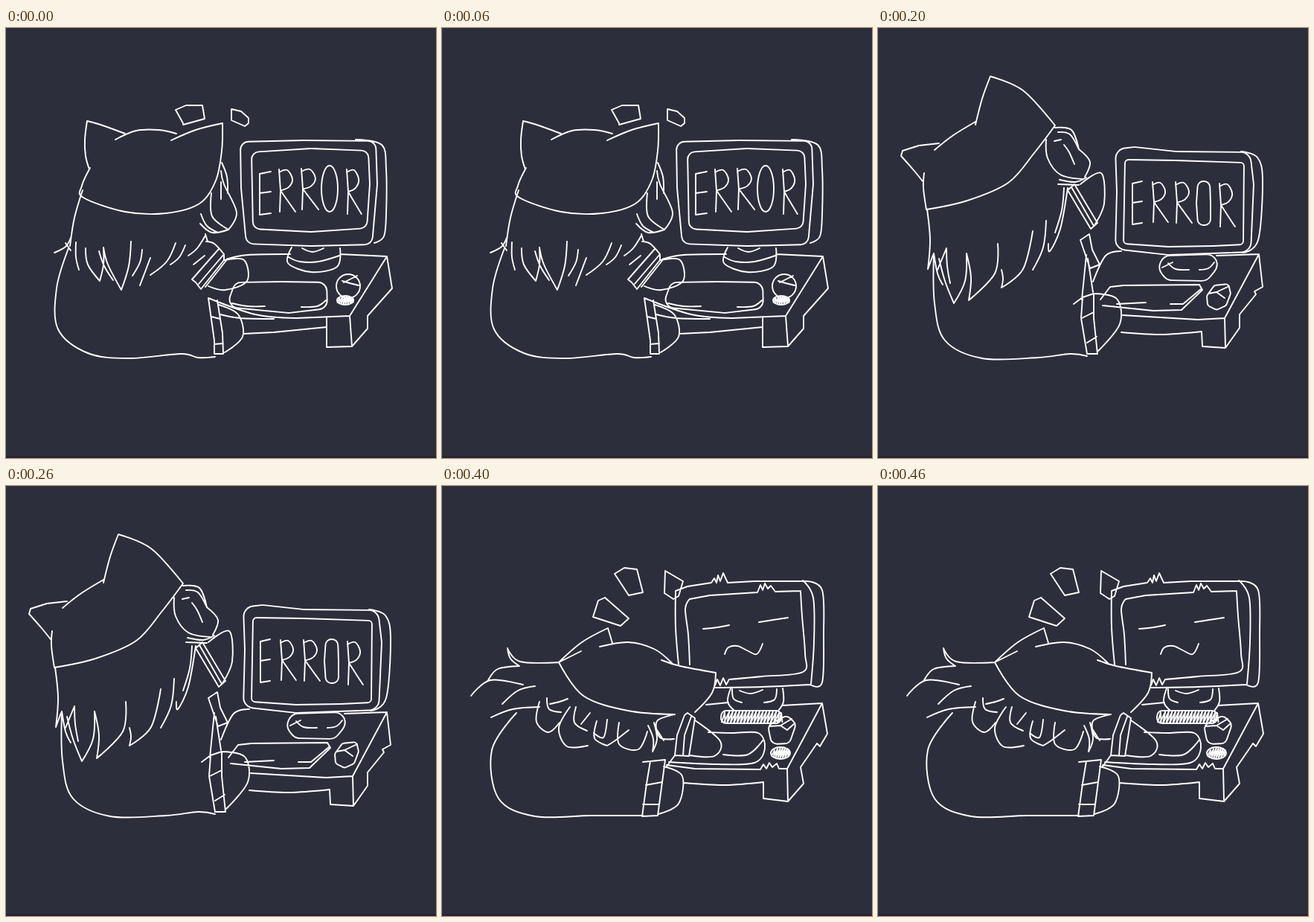
An HTML page with a canvas that plays this animation: 578 px wide and 578 px high, repeating every 0.5 s.

```html
<!DOCTYPE html>
<html lang="en">
<head>
<meta charset="utf-8">
<title>Computer error</title>
<style>
  html, body { margin: 0; width: 100%; height: 100%; overflow: hidden; background: #2d2e3b; }
  canvas { display: block; width: 100%; height: 100%; }
</style>
</head>
<body>
<canvas id="stage" width="578" height="578"></canvas>
<script>
const ctx = document.getElementById('stage').getContext('2d');

// Straight segments through the points.
function line(x, y, ...rest) {
  ctx.moveTo(x, y);
  for (let i = 0; i < rest.length; i += 2) ctx.lineTo(rest[i], rest[i + 1]);
}

// Smooth stroke through the points.
function curve(...p) {
  const slope = i => i < 2 || i > p.length - 3 ? [0, 0]
    : [(p[i + 2] - p[i - 2]) / 6, (p[i + 3] - p[i - 1]) / 6];
  ctx.moveTo(p[0], p[1]);
  for (let i = 2; i < p.length; i += 2) {
    const [ax, ay] = slope(i - 2), [bx, by] = slope(i);
    ctx.bezierCurveTo(p[i - 2] + ax, p[i - 1] + ay, p[i] - bx, p[i + 1] - by, p[i], p[i + 1]);
  }
}

// Closed polygon with rounded corners.
function rounded(r, ...p) {
  const n = p.length;
  ctx.moveTo((p[0] + p[n - 2]) / 2, (p[1] + p[n - 1]) / 2);
  for (let i = 0; i < n; i += 2) ctx.arcTo(p[i], p[i + 1], p[(i + 2) % n], p[(i + 3) % n], r);
  ctx.closePath();
}

function oval(x, y, rx, ry) {
  ctx.moveTo(x + rx, y);
  ctx.ellipse(x, y, rx, ry, 0, 0, 7);
}

// Slanted scribble inside an oval; a higher power squares its ends.
function hatch(x, y, rx, ry, gap, power) {
  for (let u = 2 - rx; u < rx - 1; u += gap) {
    const h = ry * (1 - Math.abs(u / rx) ** power) ** (1 / power);
    const lean = Math.min(h / 2, rx - Math.abs(u));
    line(x + u - lean, y + h, x + u + lean, y - h, x + u + gap - lean, y + h);
  }
}

function letterE(x, y, w, h) {
  line(x + w, y, x, y + 3, x, y + h, x + w, y + h - 2);
  line(x, y + h / 2, x + w, y + h / 2 - 2);
}

function letterR(x, y, w, h) {
  line(x, y, x + 2, y + h / 2, x + 1, y + h);
  curve(x, y + 4, x + w * .55, y + 1, x + w * .9, y + h * .23, x + w * .65, y + h * .42, x + 2, y + h / 2);
  curve(x + 2, y + h / 2, x + w * .6, y + h * .75, x + w * 1.1, y + h);
}

function typing() {
  curve(112, 190, 107, 172, 106, 150, 109, 125);
  curve(109, 125, 130, 131, 160, 142);
  curve(147, 150, 175, 138, 205, 137, 229, 142);
  curve(222, 151, 255, 137, 291, 128);
  curve(291, 128, 290, 165, 282, 205, 260, 236, 215, 249, 160, 247, 104, 228, 102, 212, 113, 188);
  line(238, 128, 228, 110, 242, 104, 264, 104, 267, 122, 238, 130);
  line(303, 109, 316, 112, 326, 121, 326, 128, 321, 132, 303, 124, 303, 109);

  curve(103, 218, 92, 255, 86, 293);
  curve(65, 302, 80, 294, 87, 282);
  line(80, 289, 87, 299);
  curve(94, 288, 94, 308, 98, 325);
  curve(107, 296, 110, 318, 126, 340);
  curve(126, 340, 131, 318, 131, 295);
  curve(125, 300, 132, 320, 144, 339);
  curve(131, 295, 137, 318, 155, 352);
  curve(155, 352, 165, 320, 168, 287);
  curve(170, 333, 180, 315, 183, 298);
  curve(180, 346, 188, 325, 194, 309);
  curve(194, 332, 216, 314, 228, 289);
  curve(221, 318, 233, 308, 241, 292);
  curve(245, 306, 257, 296, 268, 279);

  curve(290, 181, 297, 200, 298, 222);
  curve(289, 192, 293, 210, 310, 248, 299, 271);
  curve(276, 222, 277, 253, 299, 271);
  line(289, 207, 289, 230);
  curve(261, 263, 277, 275, 299, 271);
  curve(262, 250, 270, 266, 285, 275);
  line(268, 277, 271, 287);

  curve(84, 296, 68, 350, 70, 405, 110, 437, 165, 444, 235, 438, 258, 443, 281, 442);
  curve(269, 287, 280, 290, 293, 304);
  line(286, 297, 250, 338, 255, 342, 262, 351, 293, 312, 293, 304, 259, 344);
  line(267, 306, 252, 318);
  line(298, 310, 268, 348);
  curve(294, 312, 320, 312, 324, 340, 295, 352, 272, 347);
  line(272, 363, 280, 420, 280, 438, 292, 438, 291, 410, 284, 366);
  line(276, 388, 288, 391);
  line(280, 425, 292, 424);
  curve(286, 372, 312, 385, 318, 415, 294, 436);

  curve(296, 311, 325, 305, 382, 304);
  line(449, 304, 512, 307, 462, 387, 390, 390);
  curve(390, 390, 335, 385, 272, 363);
  curve(288, 385, 315, 390, 360, 391);
  line(319, 411, 360, 409, 431, 402, 431, 429, 465, 428, 462, 387);
  line(431, 402, 431, 389);
  line(465, 428, 486, 404, 486, 387, 519, 350, 512, 307);
  rounded(12, 308, 342, 370, 341, 431, 342, 432, 377, 380, 383, 296, 375);
  curve(304, 370, 325, 374, 348, 374);
  curve(397, 375, 418, 374, 430, 366);
  oval(460, 347, 16, 16);
  line(452, 340, 462, 343, 474, 346);
  line(454, 342, 472, 333);
  oval(456, 366, 11, 6);
  hatch(456, 366, 11, 5, 3, 2);

  rounded(11, 315, 153, 400, 151, 497, 152, 499, 210, 492, 291, 410, 293, 323, 290, 316, 215);
  curve(470, 150, 505, 157, 511, 190, 511, 250, 508, 280, 495, 289);
  rounded(10, 330, 167, 410, 162, 487, 165, 489, 210, 485, 269, 410, 274, 332, 270);
  curve(384, 295, 379, 316, 410, 328, 445, 321, 449, 296);
  curve(380, 308, 395, 314, 420, 314, 448, 306);
  curve(398, 296, 412, 301, 427, 296);

  letterE(341, 193, 15, 58);
  letterR(367, 190, 20, 57);
  letterR(397, 189, 21, 55);
  oval(435, 216, 11, 31);
  letterR(458, 190, 18, 60);
}

function idleComputer() {
  rounded(14, 319, 163, 345, 160, 400, 166, 500, 167, 505, 210, 501, 301, 390, 305, 319, 297, 321, 220);
  curve(488, 166, 510, 174, 517, 205, 511, 285, 490, 302);
  rounded(5, 332, 177, 400, 178, 492, 181, 491, 291, 450, 293, 390, 294, 330, 290);
  rounded(15, 384, 306, 451, 304, 458, 320, 442, 340, 388, 339, 376, 323);
  line(382, 322, 396, 315);
  curve(390, 316, 400, 324, 418, 325);
  curve(432, 325, 444, 323, 452, 315);

  curve(327, 300, 306, 306, 289, 341);
  line(455, 306, 512, 304, 466, 390, 430, 392, 329, 386);
  line(512, 304, 517, 348, 506, 354, 508, 358, 486, 385, 486, 403, 467, 430, 436, 428, 435, 408);
  curve(435, 408, 380, 412, 327, 409);
  line(466, 390, 467, 430);
  line(299, 365, 312, 348, 330, 346, 432, 345, 436, 352, 408, 379, 370, 380, 302, 373);
  line(321, 371, 360, 369);
  line(393, 371, 410, 371, 434, 351);
  rounded(5, 442, 360, 452, 346, 471, 344, 474, 357, 468, 373, 455, 379, 443, 373);
  line(444, 357, 455, 355, 466, 363);
  line(455, 355, 472, 347);

  letterE(342, 206, 13, 58);
  letterR(369, 207, 19, 54);
  letterR(400, 207, 20, 55);
  rounded(8, 430, 206, 446, 206, 447, 235, 447, 265, 430, 265, 428, 235);
  letterR(459, 209, 19, 58);
}

function leaningBack() {
  idleComputer();
  curve(82, 190, 77, 205, 75, 226);
  line(75, 220, 60, 195, 42, 152, 70, 153, 103, 152);
  curve(95, 161, 120, 140, 158, 126);
  curve(152, 141, 172, 102, 199, 67);
  curve(199, 67, 218, 98, 237, 134);
  curve(237, 134, 250, 139, 261, 150);
  curve(261, 150, 220, 193, 165, 217, 115, 228, 75, 226);

  curve(75, 222, 71, 250, 74, 290, 75, 318);
  line(76, 296, 63, 317, 70, 312);
  curve(87, 283, 88, 315, 102, 343);
  line(107, 291, 108, 349);
  curve(107, 300, 113, 325, 128, 345);
  curve(124, 298, 130, 330, 150, 362);
  curve(150, 362, 165, 325, 167, 290);
  curve(184, 296, 180, 320, 166, 340);
  curve(170, 352, 199, 325, 208, 281);
  curve(208, 281, 216, 315, 204, 347);
  curve(233, 276, 234, 297, 228, 314);
  curve(228, 331, 241, 300, 241, 265, 248, 225);

  curve(248, 168, 246, 190, 256, 212, 278, 217);
  curve(261, 150, 278, 158, 284, 184);
  curve(256, 159, 272, 160, 284, 184);
  line(284, 184, 297, 203, 290, 212, 289, 224);
  line(262, 170, 270, 171);
  line(268, 177, 276, 200);
  curve(238, 210, 254, 222, 276, 221);
  line(250, 215, 247, 249, 261, 242);

  curve(76, 300, 75, 370, 90, 423, 150, 445, 220, 441, 294, 440);
  curve(270, 236, 303, 223, 316, 238, 295, 287);
  line(260, 238, 271, 234, 298, 279, 289, 290, 276, 278, 260, 238);
  curve(265, 236, 278, 265, 294, 284);
  line(268, 296, 287, 290);
  curve(287, 290, 293, 312, 289, 335);
  curve(275, 294, 278, 312, 288, 321);
  curve(280, 315, 277, 370, 273, 400, 279, 438);
  line(281, 316, 289, 369, 288, 395, 293, 438);
  line(262, 372, 280, 368, 289, 369);
  line(273, 390, 288, 385);
  line(276, 428, 293, 418);
  curve(290, 373, 322, 381, 329, 410, 296, 437);
}

function leaningFurther() {
  idleComputer();
  curve(60, 206, 47, 190, 31, 172);
  line(31, 172, 33, 165, 55, 158, 82, 155);
  curve(62, 195, 61, 215, 65, 244);
  curve(76, 164, 100, 145, 131, 126);
  curve(131, 130, 140, 95, 151, 65);
  curve(151, 65, 195, 84, 238, 131);
  curve(238, 131, 210, 168, 175, 208, 120, 232, 65, 244);

  curve(66, 244, 70, 285, 67, 324);
  line(67, 324, 74, 305);
  curve(75, 303, 80, 330, 87, 345);
  line(80, 325, 92, 296);
  curve(92, 296, 93, 320, 97, 343);
  curve(82, 310, 90, 340, 102, 370);
  curve(102, 370, 117, 340, 119, 303);
  curve(119, 303, 125, 335, 122, 366);
  curve(122, 366, 157, 330, 161, 290);
  curve(166, 325, 168, 337, 166, 349);
  curve(166, 349, 195, 324, 208, 273);
  curve(208, 325, 222, 295, 226, 259);
  curve(229, 290, 231, 300, 245, 270, 255, 215);

  curve(226, 150, 228, 175, 245, 197, 275, 203);
  curve(238, 134, 260, 137, 270, 163);
  curve(242, 140, 258, 143, 270, 163);
  curve(270, 163, 285, 180, 278, 200);
  line(237, 152, 246, 150);
  curve(250, 157, 257, 167, 264, 183);
  curve(244, 204, 265, 207, 280, 201);
  line(242, 210, 270, 211);
  curve(250, 215, 247, 245, 238, 275);

  curve(75, 303, 76, 370, 90, 420, 140, 444, 215, 443, 258, 438, 281, 441);
  curve(272, 210, 300, 195, 304, 236, 291, 265);
  line(255, 218, 264, 210, 295, 262, 286, 270, 255, 218);
  line(260, 214, 290, 266);
  line(272, 285, 284, 277, 288, 298, 298, 318, 285, 323, 272, 285);
  line(280, 305, 274, 365);
  line(282, 310, 289, 355);
  line(263, 371, 275, 362, 290, 357, 290, 390, 295, 438, 281, 438, 273, 390, 275, 362);
  line(274, 390, 290, 382);
  line(281, 423, 294, 415);
  curve(290, 357, 321, 364, 325, 398, 296, 434);
}

function collapsed() {
  line(219, 150, 251, 178, 240, 188, 203, 176, 210, 154, 219, 150);
  line(232, 118, 245, 110, 262, 112, 270, 143, 251, 147, 232, 118);
  line(300, 114, 324, 128, 318, 148, 311, 152, 299, 144, 300, 114);

  curve(104, 242, 92, 232, 88, 218);
  curve(88, 218, 105, 236, 157, 237);
  line(157, 237, 187, 222);
  curve(157, 237, 188, 210, 223, 191);
  line(223, 191, 229, 211);
  curve(212, 216, 250, 210, 285, 219, 309, 238);
  curve(157, 237, 190, 282, 250, 302, 312, 307);
  curve(295, 234, 320, 242, 368, 251);
  curve(368, 251, 363, 278, 340, 304);

  curve(62, 261, 75, 246, 104, 242);
  curve(39, 282, 65, 261, 109, 267);
  curve(81, 293, 102, 275, 125, 269);
  curve(66, 311, 95, 300, 131, 297);
  curve(131, 290, 127, 317, 143, 331, 158, 318);
  curve(141, 285, 144, 300, 160, 304);
  curve(145, 293, 158, 290, 169, 286);
  curve(172, 297, 157, 325, 168, 350, 196, 349);
  curve(180, 297, 178, 318, 195, 329);
  line(187, 320, 199, 305);
  curve(208, 316, 205, 339, 222, 349);
  curve(204, 332, 217, 338, 222, 314);
  curve(238, 318, 238, 347, 264, 354, 276, 330);
  curve(222, 349, 233, 342, 251, 328);
  curve(277, 322, 284, 340, 283, 357);
  curve(283, 357, 289, 340, 285, 318);
  line(287, 325, 298, 342);

  curve(100, 305, 67, 355, 76, 420, 125, 444, 200, 443, 270, 443);
  line(270, 371, 300, 368, 290, 443, 269, 444, 275, 400, 280, 370);
  line(274, 402, 296, 398);
  line(270, 428, 292, 428);
  curve(298, 377, 323, 390, 318, 427, 291, 441);
  curve(313, 307, 289, 316, 293, 338, 312, 340);
  line(313, 362, 316, 335, 326, 308, 330, 305, 340, 312, 332, 363, 313, 362, 302, 377);
  line(324, 362, 326, 335, 335, 310);
  curve(340, 315, 374, 343, 366, 363, 333, 362);

  curve(318, 240, 314, 190, 314, 141);
  line(314, 141, 330, 135, 362, 130, 366, 124, 369, 130, 371, 120, 374, 128, 378, 117, 384, 130, 420, 128, 490, 128);
  curve(485, 127, 499, 150, 500, 210, 496, 266);
  curve(490, 128, 511, 140, 513, 200, 511, 264, 495, 267);
  curve(495, 267, 430, 270, 367, 271);
  curve(333, 240, 331, 200, 327, 165, 333, 152);
  line(333, 152, 360, 147, 424, 143, 428, 133, 431, 140, 434, 131, 438, 138, 442, 134, 448, 142, 482, 141);
  curve(482, 141, 484, 175, 488, 225, 485, 250, 430, 256, 386, 260);
  line(386, 260, 382, 267, 378, 258, 374, 268, 370, 260, 367, 268);
  curve(351, 192, 370, 190, 386, 187);
  curve(426, 183, 445, 180, 465, 177);
  curve(380, 226, 385, 217, 397, 215, 410, 221, 423, 226, 431, 212);

  curve(388, 272, 384, 290, 393, 302);
  curve(458, 272, 459, 290, 452, 302);
  curve(390, 273, 392, 286, 403, 291);
  curve(450, 273, 447, 287, 433, 291);
  curve(400, 275, 415, 279, 431, 274);
  rounded(7, 376, 302, 457, 302, 455, 319, 374, 319);
  hatch(416, 311, 40, 8, 4.5, 6);

  line(355, 294, 385, 291);
  line(457, 295, 511, 292, 464, 380, 453, 380, 450, 373, 444, 378, 440, 372, 436, 380, 432, 374, 428, 381, 340, 380, 302, 375);
  line(511, 292, 518, 333, 508, 350, 504, 346, 482, 378, 486, 400, 465, 424, 432, 420, 432, 398);
  curve(432, 398, 380, 402, 325, 399);
  line(464, 380, 465, 424);
  curve(358, 331, 390, 332, 425, 332, 434, 352, 420, 372, 370, 374, 305, 371);
  curve(378, 361, 411, 361, 432, 341);
  rounded(9, 438, 322, 464, 308, 476, 320, 467, 346, 443, 347);
  line(440, 323, 455, 322, 464, 328, 474, 319);
  line(455, 322, 470, 313);
  oval(455, 359, 13, 8);
  hatch(455, 359, 12, 7, 3.2, 2);
}

const poses = [typing, leaningBack, leaningFurther, collapsed, collapsed];
let shown;

function tick() {
  const pose = poses[Math.floor(performance.now() % 500 / 100)];
  if (pose !== shown) {
    shown = pose;
    ctx.fillStyle = '#2d2e3b';
    ctx.fillRect(0, 0, 578, 578);
    ctx.fillStyle = '#2b2033';
    ctx.fillRect(0, 575.5, 578, 2.5);
    ctx.strokeStyle = '#fff';
    ctx.lineWidth = 1.9;
    ctx.lineCap = ctx.lineJoin = 'round';
    ctx.beginPath();
    pose();
    ctx.stroke();
  }
  requestAnimationFrame(tick);
}
tick();
</script>
</body>
</html>
```
